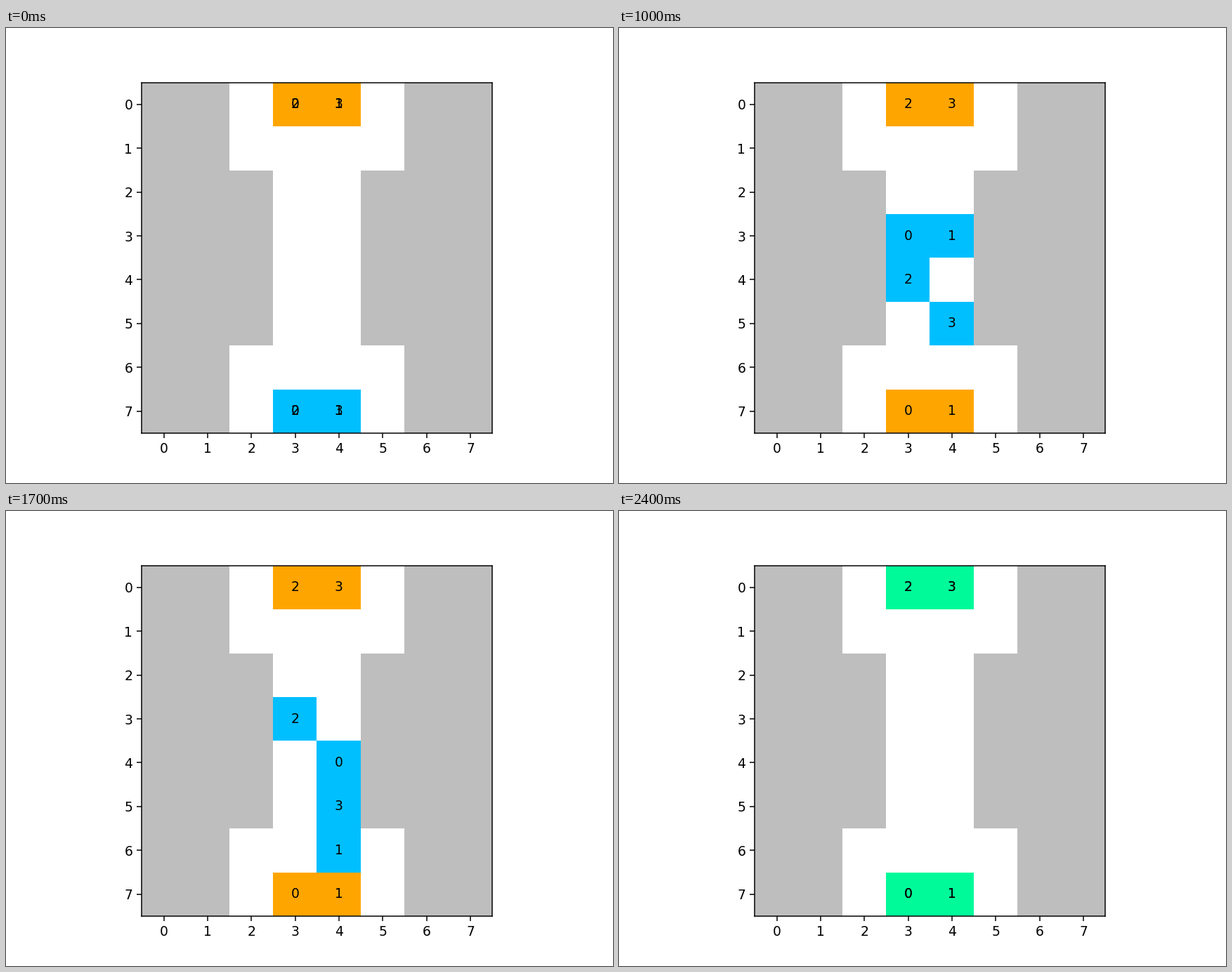
A matplotlib script that plays this animation: 864 by 648 pixels, repeating every 8 s.

```python
import numpy as np
import matplotlib.pyplot as plt
from matplotlib.animation import FuncAnimation
from matplotlib.colors import to_rgb

STEP_MS = 100
FRAMES = 80

FREE, WALL = to_rgb("white"), (190 / 255,) * 3
AGENT, GOAL, DONE = map(to_rgb, ("deepskyblue", "orange", "mediumspringgreen"))

STARTS = [(0, 3), (0, 4), (7, 3), (7, 4)]
GOALS = [(7, 3), (7, 4), (0, 3), (0, 4)]
MOVES = [
    "DDD" + "." * 11 + "R.DLDDD",
    "DDD" + "." * 7 + "D..DLDRD",
    "UUU" + "." * 11 + "RLUUUU",
    "UUU" + "." * 6 + "D..D..U..UUU.UU",
]

# Two rooms joined by a corridor, surrounded by walls
maze = np.full((8, 8, 3), WALL)
maze[:, 3:5] = FREE
maze[:2, 2:6] = FREE
maze[6:, 2:6] = FREE


def position(agent, step):
    row, col = STARTS[agent]
    done = MOVES[agent][:step]
    return (row + done.count("D") - done.count("U"),
            col + done.count("R") - done.count("L"))


def paint(positions):
    grid = maze.copy()
    for pos, goal in zip(positions, GOALS):
        if pos == goal:
            grid[pos] = DONE
        else:
            grid[pos] = AGENT
            grid[goal] = GOAL
    return grid


def label(number, pos):
    row, col = pos
    return ax.text(col, row, str(number), ha="center", va="center")


plt.rcParams.update({"font.family": "DejaVu Sans", "font.size": 10})
fig, ax = plt.subplots(figsize=(6.4, 4.8), dpi=135)
image = ax.imshow(paint(STARTS), interpolation="nearest")
ax.set_xticks(range(8))
ax.set_yticks(range(8))

for number, goal in enumerate(GOALS):
    label(number, goal)
agent_labels = [label(number, pos) for number, pos in enumerate(STARTS)]


def update(step):
    positions = [position(agent, step) for agent in range(len(STARTS))]
    image.set_data(paint(positions))
    for text, (row, col) in zip(agent_labels, positions):
        text.set_position((col, row))
    return [image, *agent_labels]


anim = FuncAnimation(fig, update, frames=FRAMES, interval=STEP_MS,
                     repeat=True, repeat_delay=0)
plt.show()
```
